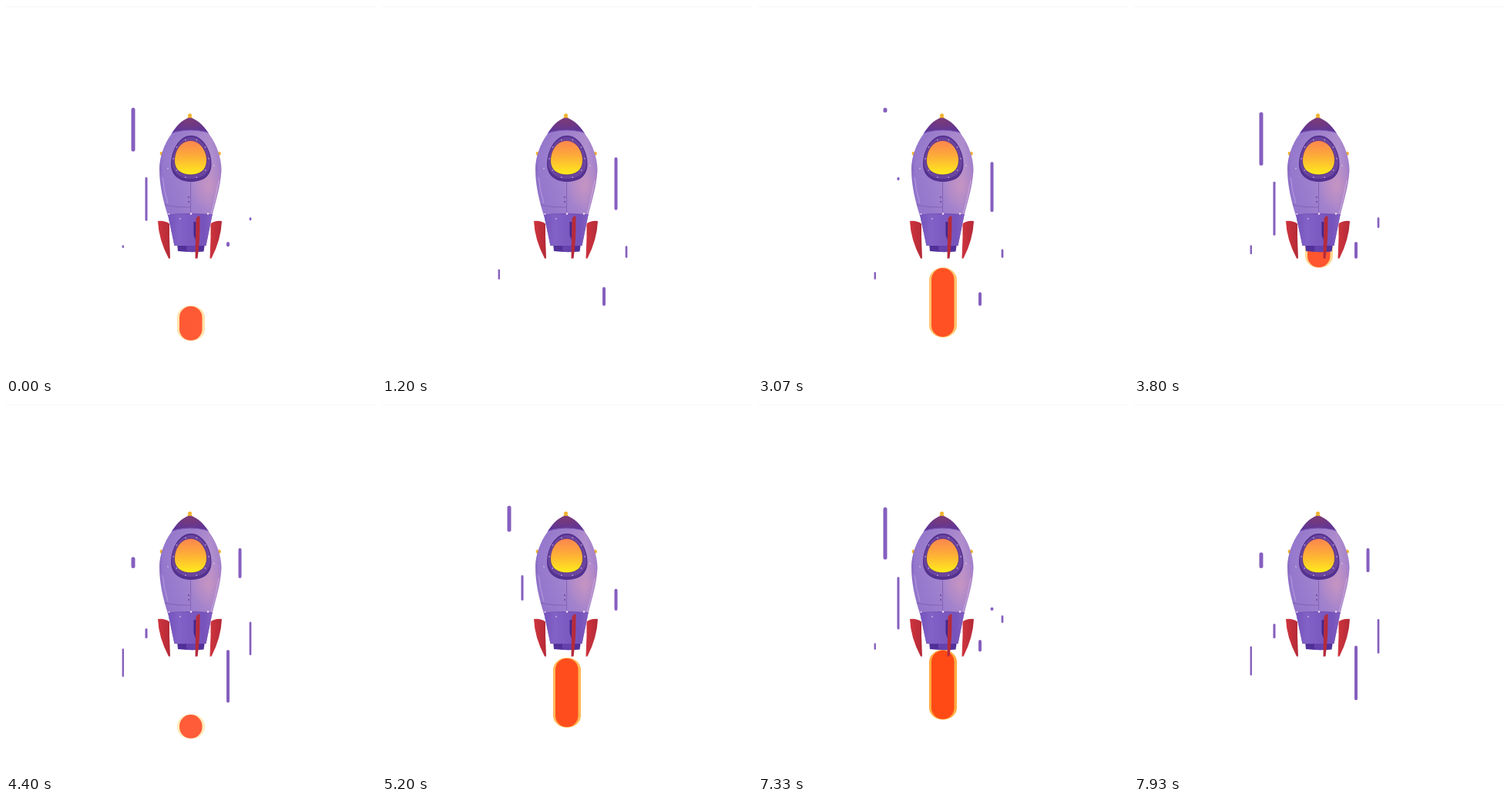
Animation, 480 px wide and 480 px high, one loop 8 s. Source, as an HTML page:

```html
<!DOCTYPE html>
<html lang="en">
<head>
<meta charset="utf-8">
<title>Rocket</title>
<style>
  html, body { margin: 0; width: 100%; height: 100%; overflow: hidden; background: #fff; }
  svg { display: block; width: 100vw; height: 100vh; }
</style>
</head>
<body>
<svg viewBox="0 0 480 480">
  <defs>
    <linearGradient id="hull">
      <stop offset="0" stop-color="#7a5cba"/>
      <stop offset=".1" stop-color="#9679cd"/>
      <stop offset=".4" stop-color="#a084d0"/>
      <stop offset=".78" stop-color="#b592cf"/>
      <stop offset=".93" stop-color="#a582cb"/>
      <stop offset="1" stop-color="#8060b8"/>
    </linearGradient>
    <linearGradient id="shade" x2="0" y2="1">
      <stop offset="0" stop-color="#6f4fb0" stop-opacity=".25"/>
      <stop offset=".35" stop-color="#8a66c0" stop-opacity="0"/>
      <stop offset="1" stop-color="#7d60c4" stop-opacity=".45"/>
    </linearGradient>
    <radialGradient id="glow">
      <stop offset="0" stop-color="#d79ab8" stop-opacity=".55"/>
      <stop offset="1" stop-color="#d79ab8" stop-opacity="0"/>
    </radialGradient>
    <linearGradient id="skirt">
      <stop offset="0" stop-color="#6a48b4"/>
      <stop offset=".3" stop-color="#8262c6"/>
      <stop offset=".7" stop-color="#7653bb"/>
      <stop offset="1" stop-color="#8f6bc6"/>
    </linearGradient>
    <radialGradient id="cap" cx=".48" cy=".3" r=".6">
      <stop offset="0" stop-color="#7a3a78"/>
      <stop offset="1" stop-color="#5a359c"/>
    </radialGradient>
    <linearGradient id="glass" x2="0" y2="1">
      <stop offset="0" stop-color="#fb8550"/>
      <stop offset=".45" stop-color="#fdac38"/>
      <stop offset="1" stop-color="#ffee1a"/>
    </linearGradient>
    <linearGradient id="fin">
      <stop offset="0" stop-color="#cf343d"/>
      <stop offset="1" stop-color="#b42a38"/>
    </linearGradient>
    <clipPath id="body">
      <path d="M238.5 145C249 147 258 157 264 167C273 179 279.5 197 279.5 213C278.500 235 271 256 267 274L259.500 311H218.500L210.500 273C204 254 199 232 199 211C199 197 205 179 214 167C220 157 228 147 238.500 145Z"/>
    </clipPath>
  </defs>

  <rect width="480" height="1.5" fill="#fafafa"/>
  <g id="lines" stroke="#855fbe" stroke-linecap="round"></g>
  <rect id="halo" x="222" width="36" rx="18" ry="15.5"/>
  <rect id="fire" x="225" width="29.5" rx="14.75"/>

  <g id="rocket">
    <path d="M222 308H258L256.5 318.5Q239 320 223 318Z" fill="#52309a"/>
    <path d="M234 309H247V319H234Z" fill="#6542ad"/>
    <g fill="#f2b32a">
      <circle cx="202" cy="191.5" r="2.4"/>
      <circle cx="276.5" cy="191.5" r="2.4"/>
      <path d="M233.5 147.5L236 144H241L243.5 147.5Z"/>
      <circle cx="238.5" cy="142" r="2.5"/>
    </g>
    <g clip-path="url(#body)">
      <path fill="url(#hull)" d="M195 140H284V315H195Z"/>
      <path fill="url(#shade)" d="M195 140H284V315H195Z"/>
      <ellipse fill="url(#glow)" cx="262" cy="233" rx="24" ry="32"/>
      <path fill="url(#cap)" d="M205 140H275V169Q258 161 239 161Q221 161 205 169Z"/>
      <path d="M205 169Q221 161 239 161Q258 161 275 169" fill="none" stroke="#7d57b8"/>
      <path fill="url(#skirt)" d="M200 272Q239 267 280 272V315H200Z"/>
      <path d="M200 272Q239 267 280 272" fill="none" stroke="#6d49b0" stroke-width=".8"/>
      <path d="M204 258Q222 262 239.5 261M239.5 228V270" fill="none" stroke="#7d5bb0" stroke-width=".8"/>
      <path d="M276 226Q272 250 266 270" fill="none" stroke="#c9aadd"/>
      <path d="M203 222Q205 240 210 256" fill="none" stroke="#b59ce2"/>
    </g>
    <g fill="#65419e">
      <circle cx="237" cy="248" r="1"/><circle cx="237" cy="254" r="1"/>
    </g>
    <g fill="#eee4fa">
      <circle cx="211.5" cy="270" r=".9"/><circle cx="240" cy="269.5" r="1.2"/>
      <circle cx="262" cy="269.5" r="1.2"/><circle cx="226" cy="276" r=".8"/>
      <circle cx="270" cy="207" r=".7"/><circle cx="210" cy="211" r=".7"/>
    </g>
    <path d="M240 168C255 168 266.5 187 266.5 205C266.500 222 254 228 240 228C226 228 214 221 214 205C214 187 225 168 240 168Z" fill="#53318f"/>
    <path d="M240 170C254 170 265 188 265 203C265 218 253 224 240 224C227 224 215.500 217 215.500 203C215.500 188 226 170 240 170Z" fill="#6b449f"/>
    <path d="M239.500 174.500C252 174.500 260.500 188 260.500 200C260.500 214 250 219 239.500 219C228 219 218.500 213 218.500 201C218.500 187 227 174.500 239.500 174.500Z" fill="url(#glass)" stroke="#4f2d86" stroke-width=".8"/>
    <g id="rivets" fill="#d5bdf0"></g>
    <path d="M197 279Q206 278 212 282.5V300L213 327.500H211Q198 303 197 279Z" fill="url(#fin)"/>
    <path d="M280 279Q271 278 265.500 282.500V300L264.500 327.500H266.500Q279 303 280 279Z" fill="url(#fin)"/>
    <path d="M246.500 280H243.500V297L246 304Z" fill="#45268a"/>
    <path d="M246.500 276Q249 271 251.500 273Q252 303 248.500 327.500H245.500Q246 300 246.500 276Z" fill="#b52b3c"/>
  </g>
</svg>
<script>
const NS = 'http://www.w3.org/2000/svg';
const FPS = 15, FRAMES = 120;
const $ = id => document.getElementById(id);

function add(parent, tag, attrs) {
  const el = document.createElementNS(NS, tag);
  for (const k in attrs) el.setAttribute(k, attrs[k]);
  return parent.appendChild(el);
}

// start is the tick at which the head leaves the top
const streaks = [
  { x: 165, y1: 134.5, y2: 210.5, w: 5, start: -9.15 },
  { x: 182, y1: 223.5, y2: 302.5, w: 3, start: -9.15 },
  { x: 303.5, y1: 189, y2: 266, w: 4, start: 5.1 },
  { x: 317, y1: 275.5, y2: 325.5, w: 2.7, start: -1.5 },
  { x: 288, y1: 308, y2: 387, w: 4, start: -1.5 },
  { x: 151.8, y1: 311.5, y2: 353.5, w: 2.4, start: -1.5 }
];
for (const s of streaks) {
  s.el = add($('lines'), 'line', { x1: s.x, x2: s.x, 'stroke-width': s.w });
}
for (let i = 0; i < 10; i++) {
  const a = (i + .5) * Math.PI / 5;
  add($('rivets'), 'circle', { cx: 240 + 23 * Math.sin(a), cy: 198 - 25.5 * Math.cos(a), r: .8 });
}

const clamp = u => Math.min(1, Math.max(0, u));
const smooth = u => u * u * (3 - 2 * u);
const linear = u => u;
const mod = (a, n) => ((a % n) + n) % n;
const mix = (a, b, k) => `rgb(${a.map((v, i) => Math.round(v + (b[i] - v) * k))})`;
const show = (el, on) => el.setAttribute('visibility', on ? 'visible' : 'hidden');

// Head and tail run the same track; the tail sets off later.
function trim(age, lag, length, y1, y2, ease) {
  const at = t => y1 + (y2 - y1) * ease(clamp(t / length));
  return [at(age - lag), at(age)];
}

function drawStreak(s, tick) {
  const [tail, head] = trim(mod(tick - s.start, 27), 9.7, 14.7, s.y1, s.y2, smooth);
  show(s.el, tick >= s.start && head - tail > .1);
  s.el.setAttribute('y1', tail);
  s.el.setAttribute('y2', head);
}

function drawFlame(tick) {
  const [tail, head] = trim(mod(tick + 9.33, 16.3), 3.5, 6.7, 305, 419, linear);
  // Strongest a little below the rocket, paler on either side
  const fade = clamp(Math.abs((head + tail) / 2 - 358) / 60);
  const put = (id, r, fill) => {
    const el = $(id);
    show(el, head - tail > .1);
    el.setAttribute('y', tail - r);
    el.setAttribute('height', head - tail + 2 * r);
    el.setAttribute('fill', fill);
  };
  put('halo', 15.5, mix([255, 165, 50], [255, 236, 185], fade));
  put('fire', 14.75, mix([255, 72, 18], [255, 92, 58], fade));
}

function draw(ms) {
  const tick = Math.floor(ms * FPS / 1000 + .06) % FRAMES;
  for (const s of streaks) drawStreak(s, tick);
  drawFlame(tick);
}

let begin;
function loop(now) {
  begin ??= now;
  draw(now - begin);
  requestAnimationFrame(loop);
}
draw(0);
requestAnimationFrame(loop);
</script>
</body>
</html>
```
